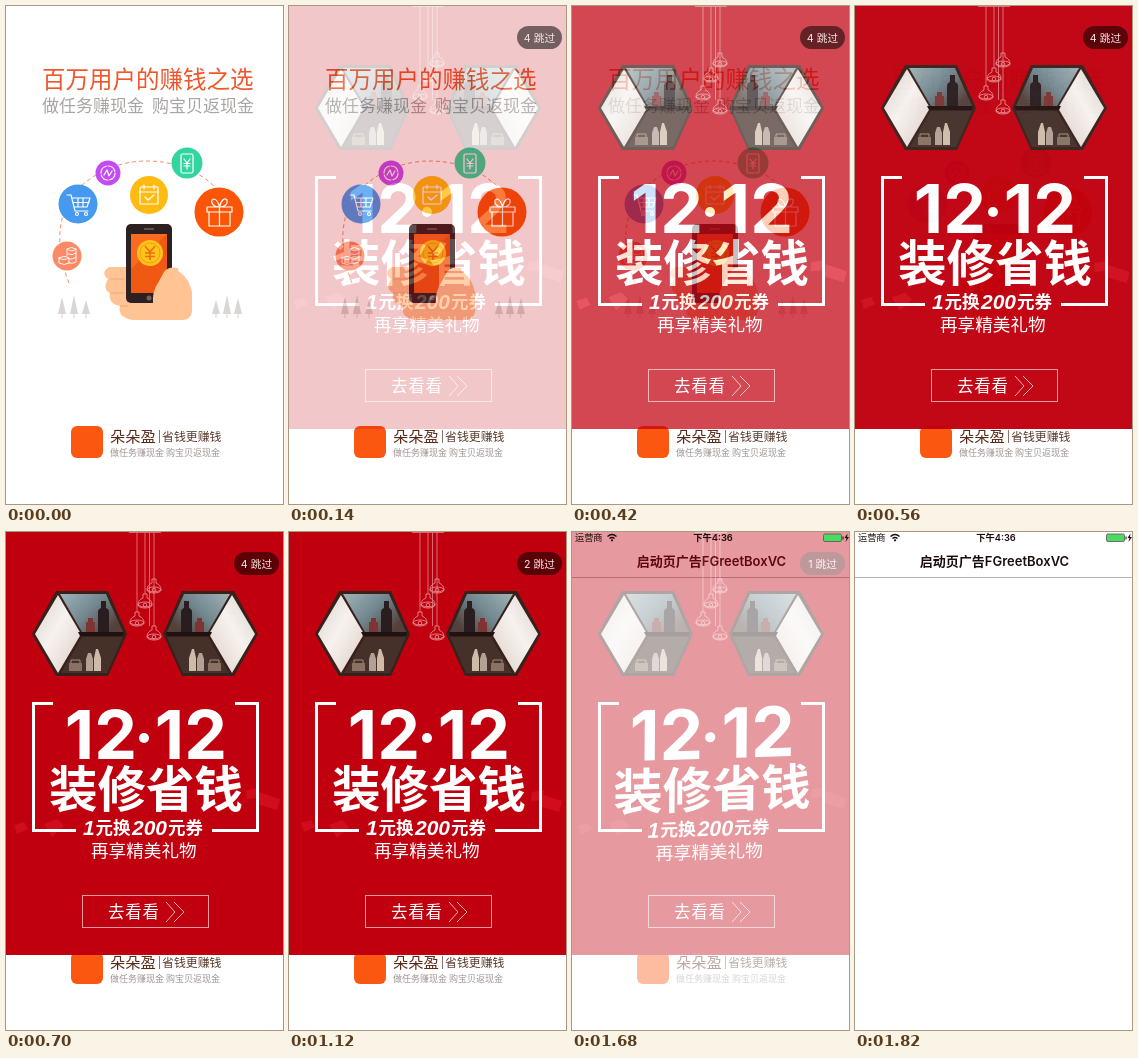
An HTML page for the animation above (1.96 s loop, 277 by 498 pixels).

```html
<!DOCTYPE html>
<html lang="zh-CN">
<head>
<meta charset="utf-8">
<title>Launch ad</title>
<style>
  html, body { margin: 0; width: 100%; height: 100%; overflow: hidden; background: #fff; }
  svg { display: block; width: 100%; height: 100%; }
  text { font-family: "Noto Sans CJK SC", "Noto Sans CJK", "Noto Sans", sans-serif; }
  .num { font-family: Inter, "Liberation Sans", sans-serif; }
  .mix { font-family: Inter, "Noto Sans CJK SC", "Noto Sans CJK", sans-serif; }
  .line { fill: none; stroke: #fff; stroke-width: 1.2; stroke-linecap: round; stroke-linejoin: round; }
</style>
</head>
<body>
<svg viewBox="0 0 277 498" preserveAspectRatio="none">
  <defs>
    <linearGradient id="side" x1="0" y1="0" x2="1" y2="1">
      <stop offset="0" stop-color="#d8d2cd"/><stop offset=".45" stop-color="#f7f2ee"/><stop offset="1" stop-color="#dccdc6"/>
    </linearGradient>
    <linearGradient id="back" x1="0" y1="0" x2="1" y2=".6">
      <stop offset="0" stop-color="#9fb3b6"/><stop offset=".55" stop-color="#71868f"/><stop offset="1" stop-color="#54413b"/>
    </linearGradient>
    <g id="shelf">
      <path d="M26 102 50 59H102L121 102 102 144H50Z" fill="#38201b"/>
      <path d="M29 102 52 63 75 102 52 141Z" fill="url(#side)"/>
      <path d="M54 62H100L117 100H76Z" fill="url(#back)"/>
      <path d="M76 105H117L101 141H55Z" fill="#45302a"/>
      <path d="M72 100H118L117 104H74Z" fill="#1f1210"/>
      <path d="M92 100V80Q92 77 95 76V69H100V76Q103 77 103 80V100Z" fill="#2a1d20"/>
      <path d="M80 100V90H82V86H87V90H89V100Z" fill="#7c3533"/>
      <path d="M80 139V127L82 121H85L87 127V139Z" fill="#b3a196"/>
      <path d="M88 139V126L90 117H92L95 126V139Z" fill="#d0bba9"/>
      <path d="M63 139V131H76V139Z" fill="#897263"/>
      <path d="M65 131V128H74V131" fill="none" stroke="#a18e80"/>
    </g>
    <g id="lamp" fill="none" stroke="#e38d8f" stroke-width=".9">
      <path d="M-2-8H2V-4Q7-2 7 3Q0 7-7 3Q-7-2-2-4Z"/>
      <ellipse cy="3" rx="7" ry="3"/><circle cy="3" r="1.8"/>
    </g>
  </defs>

  <g id="page">
    <rect width="277" height="498" fill="#fff"/>
    <rect y="45" width="277" height="1" fill="#b4b4b4"/>
    <text class="mix" x="139.5" y="34" font-size="13" font-weight="600" text-anchor="middle" fill="#1c0d0d">启动页广告FGreetBoxVC</text>
  </g>

  <g id="splash">
    <rect width="277" height="498" fill="#fff"/>
    <g id="intro">
      <text x="36" y="82" font-size="23.5" font-weight="300" fill="#f0562a">百万用户的赚钱之选</text>
      <g font-size="17" font-weight="300" fill="#a9a5a3">
        <text x="36" y="106">做任务赚现金</text><text x="146" y="106">购宝贝返现金</text>
      </g>
      <path d="M63 277C50 245 48 205 75 180C95 162 120 155 140 155C165 155 190 162 210 182" fill="none" stroke="#f2905f" stroke-dasharray="4 3"/>
      <g id="dots"></g>
      <g class="line">
        <path d="M61 189H65L69 205H82M66 192H84L81 201H68M72 192V201M77 192V201M67 196.500H83"/>
        <circle cx="71" cy="208" r="1.5"/><circle cx="80" cy="208" r="1.5"/>
        <circle cx="102" cy="167" r="7" stroke-dasharray="9 2"/><path d="M98 169 101 164 103 170 106 165"/>
        <rect x="134" y="181" width="18" height="17" rx="1"/><path d="M134 186H152M138 179V183M148 179V183M139 191 142 194 148 189"/>
        <rect x="175" y="148" width="12" height="19" rx="1.500"/><path d="M178 153 181 157 184 153M181 157V163M178 157.500H184M178 160H184"/>
        <path d="M201 201H226V206H201ZM203 206V220H224V206M213.500 201V220M213.500 201C205 201 204 193 208 193Q212 194 213.500 201C215 194 219 191 221 194C222 198 219 201 213.500 201"/>
        <path d="M53 252V257Q58 260 63 257V252M53 252Q58 255 63 252Q58 249 53 252M61 250V243Q65 240 70 243V256Q67 258 63 257M61 243Q66 247 70 243M62 248Q66 250 70 247M63 253Q67 254 70 251" stroke-width=".9"/>
      </g>
      <g id="trees" fill="#d9d6d4"></g>
      <path d="M103 261H125V314H128Q111 312 114 300Q102 298 104 287Q96 283 102 273Q94 267 103 261Z" fill="#ffc394"/>
      <path d="M118 285H186V303Q186 314 176 314H127Q118 314 118 303Z" fill="#ffc394"/>
      <path d="M166 262Q186 270 186 292H160Z" fill="#ffc394"/>
      <rect x="120" y="218" width="46" height="79" rx="5" fill="#2d2021"/>
      <rect x="125" y="228" width="36" height="59" fill="#fb6a1e"/>
      <path d="M125 287V263L161 228V287Z" fill="#ef5914"/>
      <path d="M138 223H148" stroke="#75605b" stroke-width="1.500"/>
      <circle cx="143" cy="292" r="2.500" fill="#75605b"/>
      <circle cx="144" cy="247" r="13" fill="#ffc51a"/>
      <circle cx="144" cy="247" r="10" fill="none" stroke="#f39b13"/>
      <path d="M139 240 144 246 149 240M144 246V254M139 247H149M139 250.500H149" fill="none" stroke="#ea6f10" stroke-width="1.600"/>
      <path d="M147 299Q146 285 152 277L158 266Q162 260 172 262Q174 275 172 299Z" fill="#ffc394"/>
      <path d="M104 273H119M104 287H119M114 300H122" stroke="#efa975"/>
    </g>

    <g id="brand">
      <rect x="65" y="420" width="32" height="32" rx="6" fill="#fb5710"/>
      <text x="104" y="436" font-size="15.300" font-weight="500" fill="#5a2a18">朵朵盈</text>
      <path d="M153.500 424V437" stroke="#8d7468"/>
      <text x="156" y="434.500" font-size="11.900" fill="#5a3a2c">省钱更赚钱</text>
      <text x="104" y="450" font-size="9" fill="#a09691">做任务赚现金 购宝贝返现金</text>
    </g>

    <g id="ad">
      <rect width="277" height="423" fill="#c1000f"/>
      <path d="M123 .5H155M131 0V80M139 0V62M143.500 0V94M148 0V94" fill="none" stroke="#dd777b" stroke-width=".9"/>
      <g id="lamps"></g>
      <use href="#shelf"/>
      <use href="#shelf" transform="translate(278 0) scale(-1 1)"/>
      <g id="ribbons" fill="#dc1525">
        <path id="bitA" d="M8 293 18 290 22 297 11 302Z"/>
        <path id="bitB" d="M38 292 51 287 58 294 46 305Z"/>
        <path id="bitC" d="M241 258 253 256 251 266 240 267Z"/>
        <path id="bitD" d="M253 260 274 267 271 278 251 272Z"/>
      </g>
      <path d="M47 171.500H27.500V298.500H70M229 171.500H251.500V298.500H206" fill="none" stroke="#fff" stroke-width="3"/>
      <g id="slogan" fill="#fff" font-weight="700">
        <g class="big" text-anchor="end" font-size="68">
          <text class="num" x="131" y="227">12</text><text class="num" x="221" y="227">12</text>
        </g>
        <circle cx="138" cy="206" r="5"/>
        <text x="43" y="275" font-size="48.500">装修省钱</text>
        <g font-size="17.500">
          <text x="89.500" y="302">元换</text><text x="162" y="302">元券</text>
          <g font-size="21" font-style="italic">
            <text x="77" y="303" style="font-family:'Liberation Sans',sans-serif">1</text>
            <text x="126" y="303" style="font-family:'Liberation Sans',sans-serif">200</text>
          </g>
        </g>
        <text x="85" y="325" font-size="17.600" font-weight="500">再享精美礼物</text>
      </g>
      <rect x="76.500" y="363.500" width="126" height="32" fill="none" stroke="#ea9a9d"/>
      <text x="102" y="386" font-size="16.500" letter-spacing=".7" fill="#fff">去看看</text>
      <path d="M160 370 169 380 160 390M168 370 178 380 168 390" fill="none" stroke="#f0b3b5"/>
    </g>
    <g id="skip">
      <rect x="228" y="20" width="45" height="23" rx="11.500" fill="#000" fill-opacity=".52"/>
      <text id="count" class="mix" x="250.500" y="35.500" font-size="10.700" text-anchor="middle" fill="#f7e4e2"></text>
    </g>
  </g>

  <g id="status" fill="#1c0d0d">
    <text x="3" y="9" font-size="9.200">运营商</text>
    <g fill="none" stroke="#1c0d0d" stroke-width="1.400">
      <path d="M35.500 4.500Q40 .5 44.500 4.500M37.500 6.500Q40 4.300 42.500 6.500"/>
    </g>
    <circle cx="40" cy="8.300" r="1.100"/>
    <text class="mix" x="141" y="9" font-size="9.300" font-weight="600" text-anchor="middle">下午4:36</text>
    <rect x="251.500" y="2" width="18" height="7.500" rx="1.500" fill="#4cd964" stroke="#5a5553" stroke-width=".8"/>
    <path d="M270.500 4.500H271.500V7.500H270.500Z"/>
    <path d="M275.500 1.500 272.500 6H274.500L273.500 10 277 5H275Z"/>
  </g>
</svg>
<script>
const $ = id => document.getElementById(id);
const STEP = 140, LOOP = 1960;

const dots = [
  [102, 167, 12.5, "#c44bf2"], [181, 157, 15.5, "#32d5a0"], [143, 189, 19, "#ffbb12"],
  [72, 198, 19.5, "#459aef"], [213, 206, 24.5, "#fb5607"], [61, 250, 14.5, "#fb8a66"]
];
$("dots").innerHTML = dots.map(([x, y, r, c]) => `<circle cx="${x}" cy="${y}" r="${r}" fill="${c}"/>`).join("");

const trees = [[56, 18], [68, 20], [80, 15], [210, 15], [221, 20], [232, 17]];
$("trees").innerHTML = trees.map(([x, h]) =>
  `<path d="M${x - 4} 308L${x} ${309 - h}L${x + 4} 308ZM${x - .5} 308h1v4h-1Z"/>`).join("");

const lamps = [[148, 55], [139, 70], [131, 88], [148, 102]];
$("lamps").innerHTML = lamps.map(([x, y]) => `<use href="#lamp" x="${x}" y="${y}"/>`).join("");

const clamp = v => Math.max(0, Math.min(1, v));
const fade = (id, v) => $(id).setAttribute("opacity", v.toFixed(3));
const move = (id, x, y) => $(id).setAttribute("transform", `translate(${x.toFixed(2)} ${y.toFixed(2)})`);

function draw(time) {
  const t = Math.floor(time / STEP) * STEP;

  // ad dissolves in over the launch picture
  fade("ad", t < 700 ? clamp((t - 20) / 540) * .97 : 1);
  fade("skip", t < STEP ? 0 : 1);
  $("count").textContent = (t < 840 ? 4 : t < 1120 ? 3 : t < 1400 ? 2 : 1) + " 跳过";

  // paper scraps drift
  const d = Math.sin((t - 700) / 420 * Math.PI / 2);
  move("bitA", d * 4, -d * 2);
  move("bitB", d * 2, d);
  move("bitC", d * 2, d * 2);
  move("bitD", -d, d * 2);
  fade("ribbons", t < 560 ? 1 : .6);

  // slogan sways before the ad leaves
  const sway = t > 1260 ? Math.sin((t - 1260) / 560 * Math.PI) : 0;
  $("slogan").setAttribute("transform",
    `translate(139 250) rotate(${-2.5 * sway}) skewX(${-3 * sway}) scale(${1 + .025 * sway}) translate(-139 -250)`);

  fade("splash", t < 1680 ? 1 : t < 1820 ? .4 : 0);
  fade("status", t < 1400 ? 0 : t < 1540 ? .35 : t < 1680 ? .7 : 1);
}

const start = performance.now();
function tick() {
  draw((performance.now() - start) % LOOP);
  requestAnimationFrame(tick);
}
tick();
</script>
</body>
</html>
```
